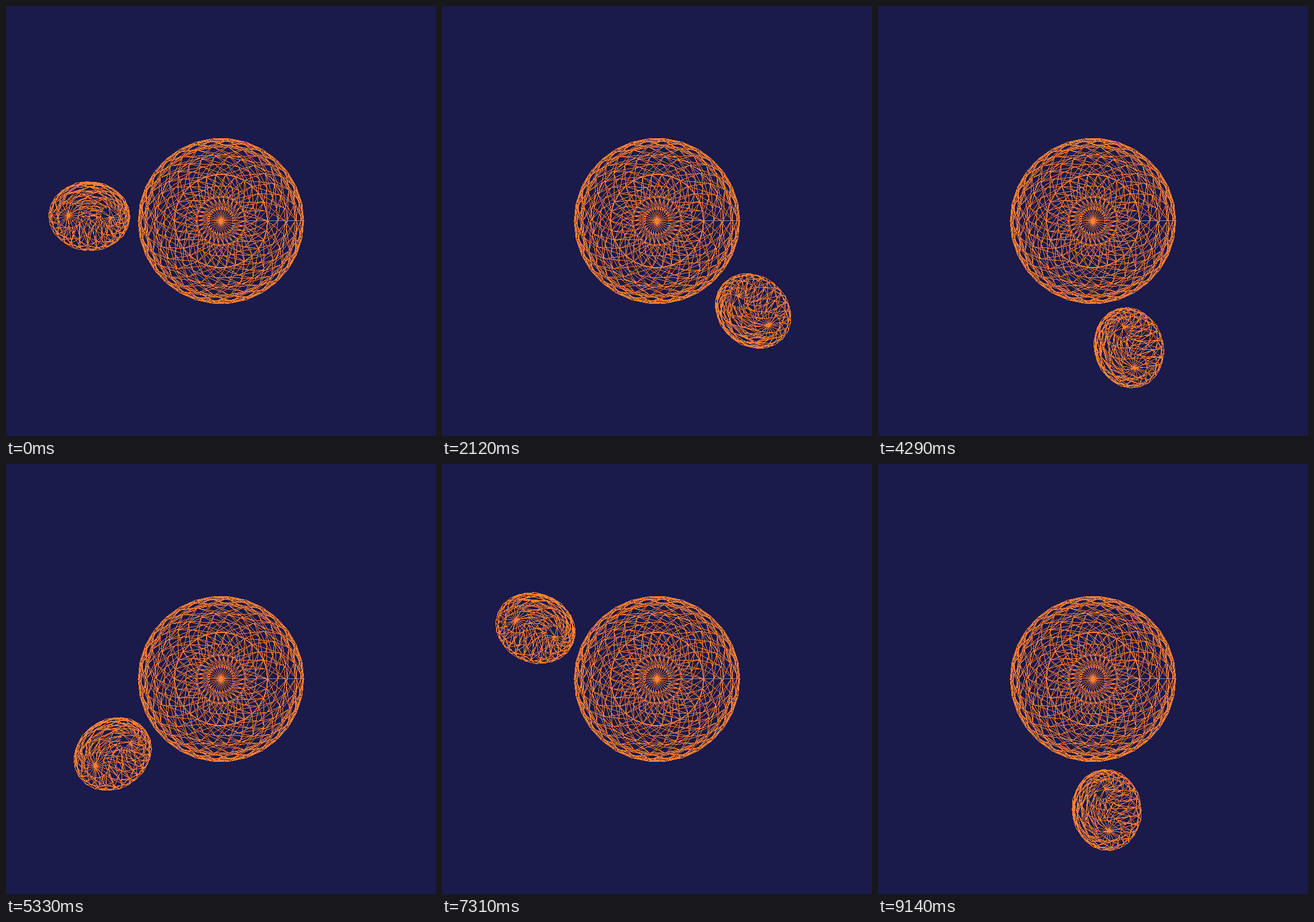
An HTML page with a canvas that plays this animation: 748x748 px, repeating every 9240 ms.

```html
<!DOCTYPE html>
<html lang="en">
<head>
<meta charset="utf-8">
<title>Orbiting wireframe spheres</title>
<style>
html, body { margin: 0; width: 100%; height: 100%; overflow: hidden; background: #1a1a4b; }
canvas { display: block; width: 748px; height: 748px; }
</style>
</head>
<body>
<canvas id="stage" width="748" height="748"></canvas>
<script>
const SIZE = 748, FOCAL = 374, DEPTH = 5, ORBIT = 2.985, LOOP = 9240;
const ctx = document.getElementById('stage').getContext('2d');

// Packed as ABGR for a little-endian Uint32Array.
const pack = (r, g, b) => (255 << 24 | b << 16 | g << 8 | r) >>> 0;
const NAVY = pack(26, 26, 75), ORANGE = pack(255, 128, 51), LILAC = pack(160, 144, 168);

const image = ctx.createImageData(SIZE, SIZE);
const pixels = new Uint32Array(image.data.buffer);

// Orbit angle in degrees, clockwise on screen: a steady swing that turns back at both ends.
const swing = [
  [0, 182.1], [2120, 43.1], [2960, -12], [3370, 15], [5330, 145.3],
  [6540, 223.9], [6750, 237.7], [8010, 156.1], [9140, 84]
];

// Runs of evenly spaced steps: first, last, count.
const runs = [
  [60, 950, 18], [1000, 1910, 21], [1950, 2860, 20], [2900, 3820, 21], [3870, 4750, 19],
  [4810, 5690, 20], [5740, 6660, 19], [6720, 7620, 20], [7670, 8560, 19], [8620, 9140, 10]
];
const steps = [0];
for (const [first, last, count] of runs)
  for (let i = 0; i < count; i++)
    steps.push(Math.round((first + (last - first) * i / (count - 1)) / 10) * 10);
for (const exact of [2120, 3370, 5330, 6540, 8010]) {
  let best = 0;
  steps.forEach((s, i) => { if (Math.abs(s - exact) < Math.abs(steps[best] - exact)) best = i; });
  steps[best] = exact;
}

function angleAt(t) {
  let i = 0;
  while (i < swing.length - 2 && t > swing[i + 1][0]) i++;
  const [t0, a0] = swing[i], [t1, a1] = swing[i + 1];
  return a0 + (a1 - a0) * (t - t0) / (t1 - t0);
}

// Sphere with its poles on the z axis. Each row holds slices + 1 points but the
// triangles stride by slices, so the mesh twists by one slice per row.
function sphere(radius, stacks, slices) {
  const points = [], edges = [], seam = [];
  for (let i = 0; i <= stacks; i++) {
    const polar = Math.PI * i / stacks;
    for (let j = 0; j <= slices; j++) {
      const turn = 2 * Math.PI * j / slices, ring = radius * Math.sin(polar);
      points.push([ring * Math.cos(turn), ring * Math.sin(turn), radius * Math.cos(polar)]);
    }
  }
  for (let k = 0; k < stacks * slices; k++) {
    const below = k + slices, next = k + 1;
    edges.push([k, below], [below, next]);
    (next % (slices + 1) ? edges : seam).push([k, next]);
  }
  return { points, edges, seam };
}

function line(x0, y0, x1, y1, color) {
  const steep = Math.abs(y1 - y0) > Math.abs(x1 - x0);
  if (steep) [x0, y0, x1, y1] = [y0, x0, y1, x1];
  if (x0 > x1) [x0, y0, x1, y1] = [x1, y1, x0, y0];
  const slope = (y1 - y0) / (x1 - x0 || 1);
  for (let u = Math.round(x0), end = Math.round(x1); u < end; u++) {
    const v = Math.floor(y0 + (u + 0.5 - x0) * slope);
    pixels[steep ? u * SIZE + v : v * SIZE + u] = color;
  }
}

function drawSphere({ points, edges, seam }, degrees, offset, seamColor) {
  const c = Math.cos(degrees * Math.PI / 180), s = Math.sin(degrees * Math.PI / 180);
  const flat = points.map(([x, y, z]) => {
    const scale = FOCAL / (DEPTH - z), px = x + offset;
    return [SIZE / 2 + (px * c + y * s) * scale, SIZE / 2 - 0.01 + (px * s - y * c) * scale];
  });
  const stroke = (list, color) => list.forEach(([a, b]) => line(...flat[a], ...flat[b], color));
  stroke(seam, seamColor);
  stroke(edges, ORANGE);
}

const planet = sphere(1.8, 15, 30), moon = sphere(0.8, 10, 20);
pixels.fill(NAVY);
drawSphere(planet, 0, 0, LILAC);
const backdrop = pixels.slice();

let shown = -1;
function frame(now) {
  const t = now % LOOP;
  let k = steps.length - 1;
  while (k > 0 && steps[k] > t) k--;
  if (k !== shown) {
    shown = k;
    pixels.set(backdrop);
    drawSphere(moon, angleAt(steps[k]), ORBIT, ORANGE);
    ctx.putImageData(image, 0, 0);
  }
  requestAnimationFrame(() => frame(performance.now() - start));
}
const start = performance.now();
frame(0);
</script>
</body>
</html>
```
